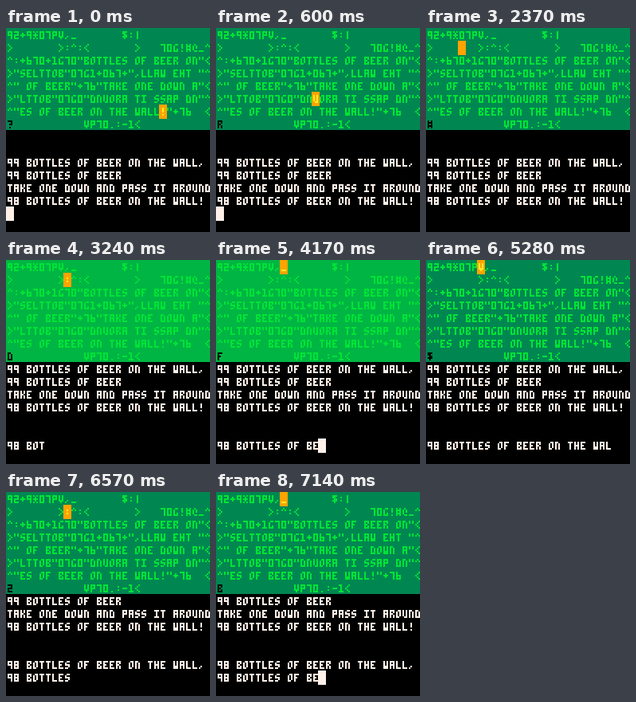
Recreate the animation shown at these times as an HTML page with a canvas. Size 256 by 256 pixels, loop 7170 ms.

```html
<!DOCTYPE html>
<html lang="en">
<head>
<meta charset="utf-8">
<title>Bottles of beer in a 2D language</title>
<style>
  html, body { margin: 0; height: 100%; overflow: hidden; background: #000; }
  canvas { display: block; width: 100vw; height: 100vh; image-rendering: pixelated; }
</style>
</head>
<body>
<canvas id="screen" width="128" height="128"></canvas>
<script>
const ctx = document.getElementById('screen').getContext('2d');
const FRAME = 30, FRAMES = 239, STEPS = 2;
const COUNTER = 'b';   // 98, kept in the bottom left cell

const PROGRAM = [
  '92+9*07PV,_       $:|',
  '>       >:^:<       >   70G!#@_^',
  '^:+670+1G70"BOTTLES OF BEER ON"<',
  '>"SELTTOB"07G1+067+",LLAW EHT "^',
  '^" OF BEER"+76"TAKE ONE DOWN A"<',
  '>"LTTOB"07G0"DNUORA TI SSAP DN"^',
  '^"ES OF BEER ON THE WALL!"+76  <',
  COUNTER + '           VP70.:-1<'
].map(row => row.padEnd(32));

const CONSOLE = [
  '', '',
  '99 BOTTLES OF BEER ON THE WALL,',
  '99 BOTTLES OF BEER',
  'TAKE ONE DOWN AND PASS IT AROUND',
  '98 BOTTLES OF BEER ON THE WALL!',
  ''
];

// Characters the counter cell flickers through
const FLICKER = '?012356789ACD$EGHIKLNOPRST#UVWB+*,_:|F><4^!@".-';

// Each letter is built from bars: x, y, width, height
const BARS = {
  0: '0015 2015 1011 1411', 1: '0021 1015 0431', 2: '0031 2111 0231 0311 0431',
  3: '0031 2015 1211 0431', 4: '0013 2015 1211', 5: '0031 0111 0231 2311 0431',
  6: '0015 1211 1411 2213', 7: '0031 2015', 8: '0015 2015 1011 1211 1411',
  9: '0013 2015 1011 1211',
  A: '0015 2015 1011 1211', B: '0015 1011 1211 1411 2012 2312', C: '0113 1021 1421',
  D: '0015 1011 2114 1411', E: '0015 1021 1211 1421', F: '0015 1021 1211',
  G: '0114 1021 1411 2312', H: '0015 2015 1211', I: '0031 1015 0431',
  K: '0015 1211 2012 2312', L: '0015 1421', N: '0015 1011 2114',
  O: '1021 0114 2113 1411', P: '0015 1011 1211 2013', R: '0015 1011 1211 2012 2312',
  S: '1021 0111 0231 2311 0421', T: '0031 1015', U: '0014 2015 1411',
  V: '0014 2014 1312', W: '0015 2015 1312',
  '!': '1013 1411', '"': '0012 2012', '#': '0015 2015 1111 1311',
  '$': '0031 0121 1221 0331 1411', '*': '0011 2011 1113 0231 0411 2411',
  '+': '1113 0231', ',': '1311 0411', '-': '0231', '.': '1411', ':': '1111 1311',
  '<': '2011 1111 0211 1311 2411', '>': '0011 1111 2211 1311 0411',
  '?': '0031 2012 1221 1411', '@': '1011 0113 2112 1421', '^': '1011 0111 2111',
  '_': '0431', '|': '1015'
};

// Runs the program from the start of the loop for a number of steps
function run(steps) {
  const cells = PROGRAM.map(row => [...row].map(c => c.charCodeAt(0)));
  const lines = [...CONSOLE], stack = [13, 33];
  let x = 24, y = 6, dx = -1, dy = 0, quoted = true;
  const pop = () => stack.pop() || 0;
  const push = v => stack.push(v);
  const go = (a, b) => { dx = a; dy = b; };
  const print = s => { lines[6] += s; };
  const move = () => { x = (x + dx + 32) % 32; y = (y + dy + 8) % 8; };
  const ops = {
    '>': () => go(1, 0), '<': () => go(-1, 0), '^': () => go(0, -1), V: () => go(0, 1),
    _: () => go(pop() ? -1 : 1, 0),
    '|': () => go(0, pop() ? -1 : 1),
    '+': () => push(pop() + pop()),
    '-': () => push(-pop() + pop()),
    '*': () => push(pop() * pop()),
    '!': () => push(pop() ? 0 : 1),
    ':': () => { const v = pop(); push(v); push(v); },
    $: pop,
    '#': move,
    '.': () => print(pop() + ' '),
    ',': () => {
      const v = pop();
      if (v === 13) { lines.shift(); lines.push(''); }
      else print(String.fromCharCode(v));
    },
    G: () => { const row = pop(); push(cells[row][pop()]); },
    P: () => { const row = pop(), col = pop(); cells[row][col] = pop(); }
  };
  while (steps--) {
    move();
    const code = cells[y][x], c = String.fromCharCode(code);
    if (c === '"') quoted = !quoted;
    else if (quoted) push(code);
    else if (c >= '0' && c <= '9') push(+c);
    else if (ops[c]) ops[c]();
  }
  return { cells, lines, x, y };
}

function rect(x, y, w, h, color) {
  ctx.fillStyle = color;
  ctx.fillRect(x, y, w, h);
}

function glyph(c, col, row, color) {
  if (!BARS[c]) return;
  for (const bar of BARS[c].split(' ')) {
    const [x, y, w, h] = [...bar].map(Number);
    rect(col * 4 + 1 + x, row * 8 + 2 + y, w, h, color);
  }
}

const block = (col, row, color) => rect(col * 4, row * 8, 5, 9, color);

function draw(frame) {
  const { cells, lines, x, y } = run(frame * STEPS);
  const bright = frame >= 83 && frame < 172;
  rect(0, 0, 128, 128, '#000');
  rect(0, 0, 128, 64, bright ? '#00b543' : '#008751');
  block(x, y, '#ffa300');
  cells.forEach((row, r) => row.forEach((code, col) => {
    const c = String.fromCharCode(code);
    if (c === COUNTER) glyph(FLICKER[frame * (frame + 7) % 47], col, r, '#000');
    else glyph(c, col, r, col === x && r === y ? '#ffec27' : '#00e436');
  }));
  lines.forEach((line, i) =>
    [...line].forEach((c, col) => glyph(c, col, i + 8, '#fff1e8')));
  if ((frame + 9) % 24 < 12) block(lines[6].length, 14, '#fff1e8');
}

const start = performance.now();
function tick() {
  const time = Math.max(0, performance.now() - start);
  draw(Math.floor(time / FRAME) % FRAMES);
  requestAnimationFrame(tick);
}
tick();
</script>
</body>
</html>
```
